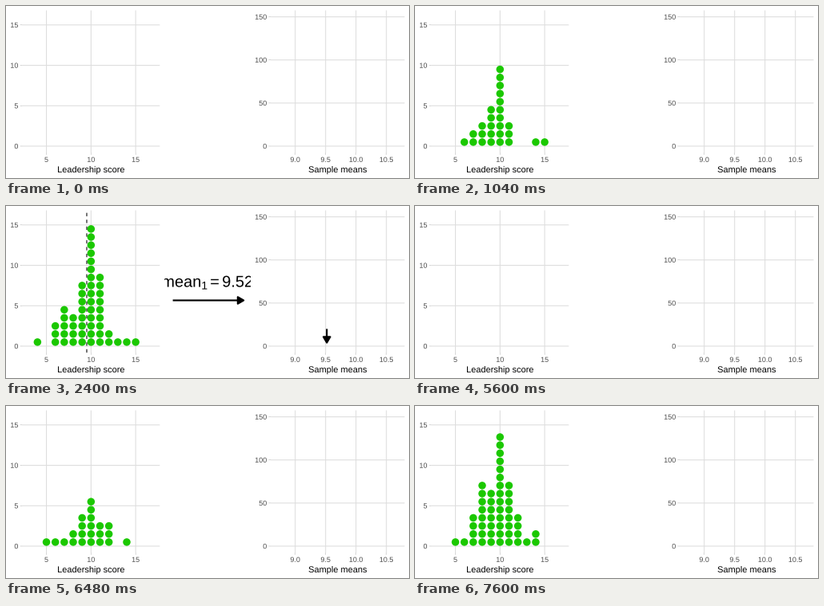
Write a matplotlib script that moves like this. It is 504x216 px and loops after 8 s.

```python
import random

import matplotlib.pyplot as plt
from matplotlib.animation import FuncAnimation
from matplotlib.patches import Circle, PathPatch, Polygon, Rectangle
from matplotlib.textpath import TextPath
from matplotlib.transforms import Affine2D

plt.rcParams["font.family"] = "Liberation Sans"

W, H = 504, 216
TOP, BOTTOM = 5.5, 184.1
GRID, TICK, LABEL, DOT = "#dedede", "#b3b3b3", "#4d4d4d", "#1bc800"
FRAMES, STEP = 100, 80
SECOND = 70            # frame at which the second sample starts
MEAN_ON = 30           # frame at which the first mean appears
SCORES = range(4, 16)

# column heights halfway and at the end of each sample
HALF_1 = [0, 0, 1, 2, 3, 5, 10, 3, 0, 0, 1, 1]
FULL_1 = [1, 0, 3, 5, 4, 8, 15, 9, 2, 1, 1, 1]
HALF_2 = [0, 1, 1, 3, 4, 6, 7, 5, 3, 0, 2, 0]
FULL_2 = [0, 1, 1, 4, 8, 7, 14, 8, 4, 1, 2, 0]

fig = plt.figure(figsize=(W / 72, H / 72), dpi=72, facecolor="white")
ax = fig.add_axes([0, 0, 1, 1])
ax.set_xlim(0, W)
ax.set_ylim(H, 0)
ax.axis("off")


def scale(lo, hi, a, b):
    return lambda v: a + (v - lo) / (hi - lo) * (b - a)


def segment(xs, ys, color, width=1.07, **kw):
    return ax.plot(xs, ys, color=color, lw=width, snap=False,
                   solid_capstyle="butt", **kw)[0]


def write(x, y, word, size, color="black", align=0.0):
    """Unhinted text on baseline y; align 0 is left, 0.5 centre, 1 right."""
    path = TextPath((0, 0), word, size=size)
    width = path.get_extents().x1 + 0.05 * size
    place = Affine2D().scale(1, -1).translate(x - align * width, y)
    return ax.add_patch(PathPatch(path.transformed(place), fc=color, lw=0,
                                  snap=False, zorder=3))


def panel(left, right, xlim, ylim, xticks, yticks, fmt, title):
    """Draw the grid, ticks and labels; return the x and y scales."""
    sx = scale(*xlim, left, right)
    sy = scale(*ylim, BOTTOM, TOP)
    for v in yticks:
        y = sy(v)
        segment([left, right], [y, y], GRID, zorder=1)
        segment([left - 2.75, left], [y, y], TICK, 0.53, zorder=1)
        write(left - 4.95, y + 3.2, str(v), 9, LABEL, 1)
    for v in xticks:
        x = sx(v)
        segment([x, x], [TOP, BOTTOM], GRID, zorder=1)
        segment([x, x], [BOTTOM, BOTTOM + 2.75], TICK, 0.53, zorder=1)
        write(x, 195.9, fmt.format(v), 9, LABEL, 0.5)
    write((left + right) / 2, 209, title, 11, align=0.5)
    return sx, sy


def arrow(x0, y0, x1, y1):
    """Straight arrow with a closed 30 degree head."""
    size = ((x1 - x0) ** 2 + (y1 - y0) ** 2) ** 0.5
    ux, uy = (x1 - x0) / size, (y1 - y0) / size
    depth, half = 7.36, 4.25
    bx, by = x1 - depth * ux, y1 - depth * uy
    head = Polygon([(x1, y1), (bx - half * uy, by + half * ux),
                    (bx + half * uy, by - half * ux)], fc="black",
                   ec="black", lw=2.13, joinstyle="round", snap=False,
                   zorder=4)
    ax.add_patch(head)
    return [segment([x0, bx], [y0, by], "black", 2.13, zorder=4), head]


def dots(seed, *stages):
    """Stack dots in random order, passing through each stage of heights."""
    rng = random.Random(seed)
    heights = [0] * len(SCORES)
    out = []
    for stage in stages:
        drawn = [i for i, (h, end) in enumerate(zip(heights, stage))
                 for _ in range(end - h)]
        rng.shuffle(drawn)
        for i in drawn:
            centre = px(SCORES[i]), py(heights[i] + 0.5)
            heights[i] += 1
            out.append(ax.add_patch(Circle(centre, 4.75, fc=DOT, lw=0,
                                           zorder=2)))
    return out


px, py = panel(20.4, 192.3, (2.3, 17.7), (-0.8, 16.8), (5, 10, 15),
               (0, 5, 10, 15), "{}", "Leadership score")
mx, my = panel(331.3, 498.5, (8.6, 10.8), (-7.5, 157.5),
               (9.0, 9.5, 10.0, 10.5), (0, 50, 100, 150), "{:.1f}",
               "Sample means")

first = dots(1, HALF_1, FULL_1)
second = dots(2, HALF_2, FULL_2)
mean = sum(s * n for s, n in zip(SCORES, FULL_1)) / sum(FULL_1)

result = [segment([px(mean)] * 2, [BOTTOM, TOP], "black", zorder=3,
                  dashes=(4, 4), dash_capstyle="butt")]
result += arrow(208.6, 118.5, 297.2, 118.5)
result += arrow(mx(mean), my(20), mx(mean), my(4))

# the formula is wider than its cell and is cut off at both sides
cell = Rectangle((198, 0), 108, H, transform=ax.transData)
formula = [write(194.3, 101.6, "mean", 20), write(244.3, 104.6, "1", 14),
           write(255.2, 101.6, "=", 20),
           write(270.2, 101.6, f"{mean:.2f}", 20)]
for part in formula:
    part.set_clip_path(cell)
result += formula


def show(items, count):
    for i, item in enumerate(items):
        item.set_visible(i < count)


def draw(frame):
    again = frame >= SECOND
    show(first, 0 if again else 2 * frame)
    show(second, 2 * (frame - SECOND) if again else 0)
    show(result, len(result) if MEAN_ON <= frame < SECOND else 0)
    return first + second + result


anim = FuncAnimation(fig, draw, frames=FRAMES, interval=STEP, repeat=True,
                     repeat_delay=0, blit=False)
plt.show()
```
